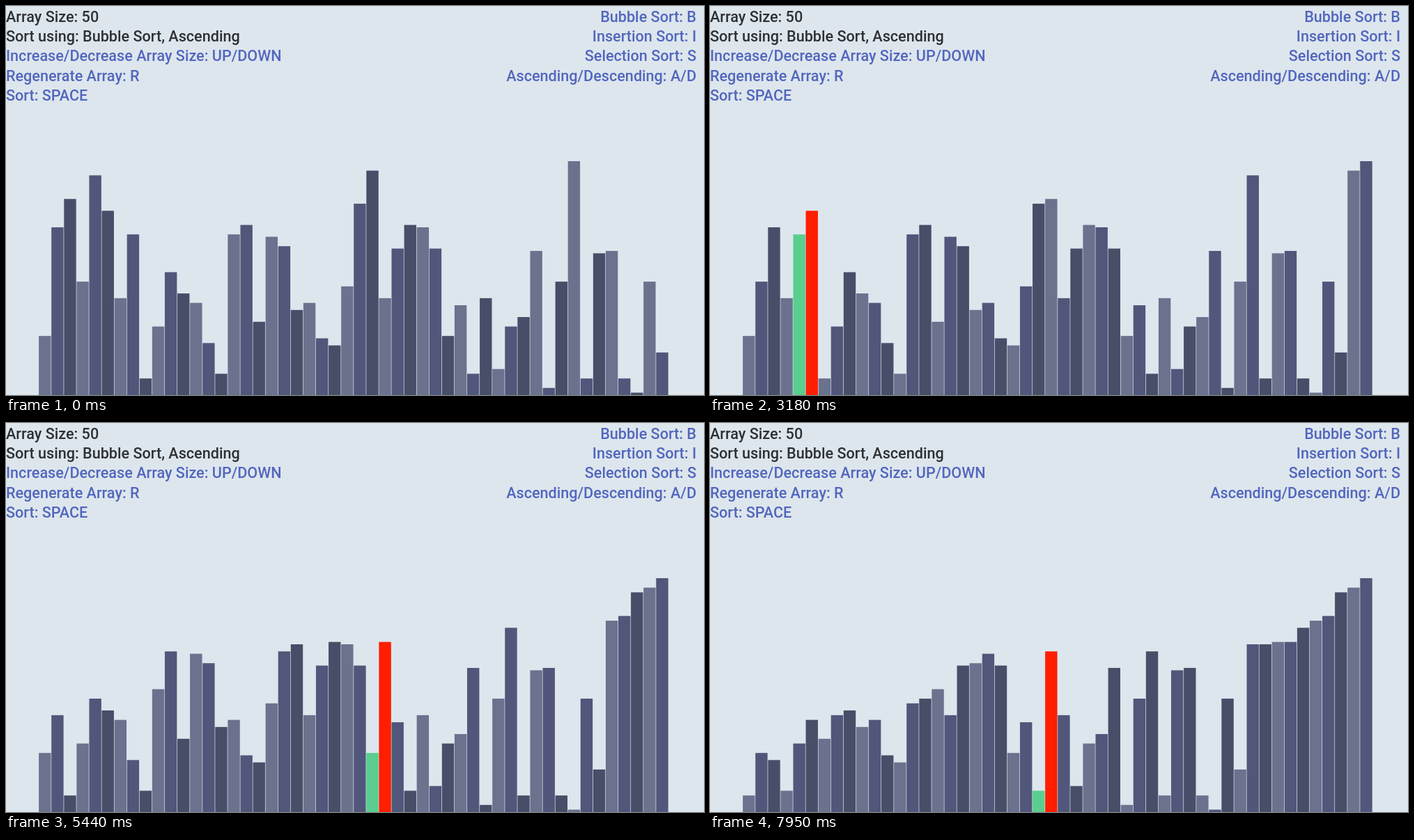
An HTML page that plays this animation: 1002x559 px, repeating every 8 s.

```html
<!DOCTYPE html>
<html lang="en">
<head>
<meta charset="utf-8">
<title>Bubble sort</title>
<style>
  html, body { margin: 0; width: 100%; height: 100%; overflow: hidden; background: #dde6ed; }
  svg { display: block; width: 100%; height: 100%; }
  text { font: 500 21.6px Roboto, sans-serif; fill: #5266bd; }
  .status { fill: #2e3033; }
  .right { text-anchor: end; }
</style>
</head>
<body>
<svg id="stage" viewBox="0 0 1002 559">
  <g id="bars"></g>
  <path id="cursor" d="M.5 .5V14L3.6 11.2L5.8 16.3L8 15.3L5.9 10.4H10Z" fill="#fff" stroke="#111"/>
</svg>
<script>
const LOOP = 8000, FIRST_TICK = 582, TICK = 66.3;
const SORT_START = 16.57, SWAPS_PER_TICK = 4.018;
const FLOOR = 559, UNIT = 3.394;
const LEFT = 47.1, PITCH = 18.085, BAR_WIDTH = 17.4;
const BAR_COLORS = ["#6b728e", "#50577a", "#474e68"];
const LOWER = "#59ce8f", HIGHER = "#ff1e00";

// The unsorted input.
const VALUES = [
  25, 71, 83, 48, 93, 78, 41, 68, 7, 29, 52, 43, 39, 22, 9, 68, 72, 31, 67, 63, 36, 39, 24, 21, 46,
  81, 95, 41, 62, 72, 71, 62, 25, 38, 9, 41, 11, 29, 33, 61, 3, 48, 99, 7, 60, 61, 7, 1, 48, 18
];

const stage = document.getElementById("stage");
const cursor = document.getElementById("cursor");

function add(parent, name, attributes) {
  const node = document.createElementNS("http://www.w3.org/2000/svg", name);
  for (const key in attributes) node.setAttribute(key, attributes[key]);
  return parent.appendChild(node);
}

function addLines(lines, x, classFor) {
  lines.forEach((line, i) => {
    add(stage, "text", { x, y: 23 + i * 28.2, class: classFor(i) }).textContent = line;
  });
}

addLines([
  `Array Size: ${VALUES.length}`,
  "Sort using: Bubble Sort, Ascending",
  "Increase/Decrease Array Size: UP/DOWN",
  "Regenerate Array: R",
  "Sort: SPACE"
], 0, i => i < 2 ? "status" : "help");
addLines([
  "Bubble Sort: B",
  "Insertion Sort: I",
  "Selection Sort: S",
  "Ascending/Descending: A/D"
], 991, () => "right");
stage.append(cursor);

const bars = VALUES.map((_, i) =>
  add(document.getElementById("bars"), "rect", { x: LEFT + i * PITCH, width: BAR_WIDTH }));

// Bubble sort stopped after the given number of swaps.
function sortUntil(swaps) {
  const values = [...VALUES];
  let active = -Infinity;
  for (let end = values.length - 1; end > 0; end--) {
    for (let j = 0; j < end; j++) {
      if (swaps <= 0) return { values, active };
      if (values[j] > values[j + 1]) {
        [values[j], values[j + 1]] = [values[j + 1], values[j]];
        active = j;
        swaps--;
      }
    }
  }
  return { values, active };
}

function drawBars(tick) {
  const { values, active } = sortUntil(Math.floor((tick - SORT_START) * SWAPS_PER_TICK));
  bars.forEach((bar, i) => {
    const height = values[i] * UNIT;
    bar.setAttribute("y", FLOOR - height);
    bar.setAttribute("height", height);
    bar.setAttribute("fill", [LOWER, HIGHER][i - active] || BAR_COLORS[i % 3]);
  });
}

// The pointer arcs in from the lower right, rests, then disappears.
function drawPointer(tick) {
  const visible = tick >= 0 && tick < 29;
  cursor.setAttribute("visibility", visible ? "visible" : "hidden");
  const p = Math.min(Math.max(tick / 16, 0), 1);
  const x = 806 + 134 * (1 - p) ** 1.5;
  const y = 380 + 89 * (1 - p) - 58 * Math.sin(Math.PI * p);
  cursor.setAttribute("transform", `translate(${Math.round(x)} ${Math.round(y)})`);
}

let start = null;

function render(now) {
  start ??= now;
  const tick = Math.floor(((now - start) % LOOP - FIRST_TICK) / TICK);
  drawBars(tick);
  drawPointer(tick);
  requestAnimationFrame(render);
}

requestAnimationFrame(render);
</script>
</body>
</html>
```
